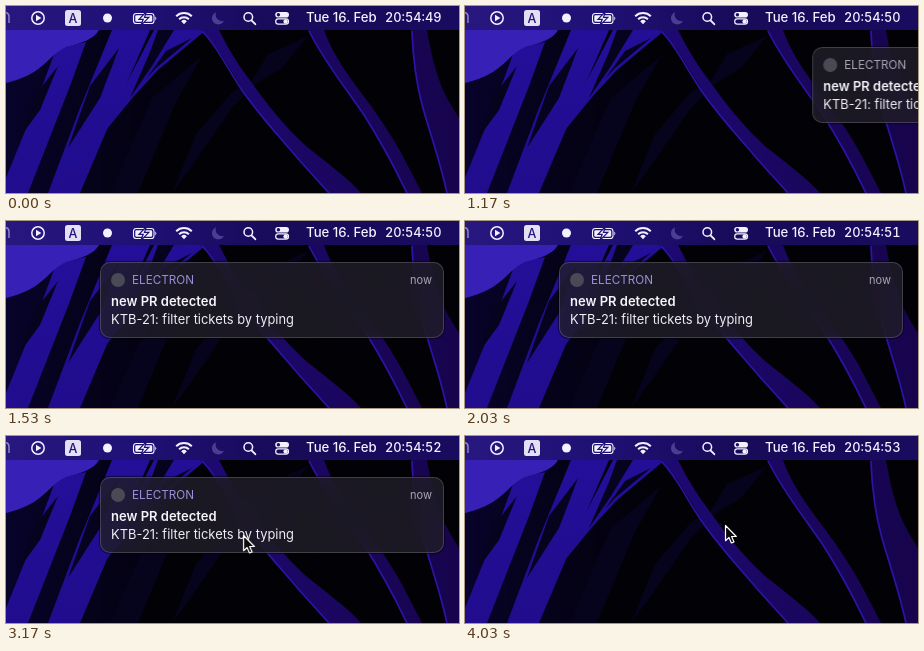
These frames come from a looping animation (453 px wide and 187 px high, 4.06 s). An HTML page:

```html
<!DOCTYPE html>
<html lang="en">
<head>
<meta charset="utf-8">
<title>Desktop notification</title>
<style>
  html, body { margin: 0; width: 100%; height: 100%; overflow: hidden; background: #020105; }
  body { position: relative; font-family: Inter, Roboto, sans-serif; }
  svg { position: absolute; left: 0; top: 0; display: block; overflow: visible; }

  .clock {
    position: absolute; left: 379px; top: 4px; height: 16px; overflow: hidden;
    font-size: 12.8px; font-weight: 500; line-height: 16px; color: #f3f0ff;
    font-variant-numeric: tabular-nums; white-space: nowrap;
  }
  .clock div { animation: tick 4060ms step-end infinite; }
  .clock span { display: block; }

  .card {
    position: absolute; left: 94px; top: 41px; width: 344px; height: 76px;
    box-sizing: border-box; border-radius: 10px;
    background: rgba(33, 30, 40, .8);
    -webkit-backdrop-filter: blur(18px); backdrop-filter: blur(18px);
    box-shadow: inset 0 0 0 1px rgba(255, 255, 255, .17), 0 0 1px 1px rgba(0, 0, 0, .5);
    animation: slide 4060ms infinite, fade 4060ms infinite;
  }
  .app { font-size: 11.7px; animation: tint 4060ms infinite; }
  .title { font-size: 13px; font-weight: 600; fill: #f6f4fa; }
  .body { font-size: 12.9px; fill: #efedf4; }
  .now { font-size: 11px; fill: #a9a6b2; }

  .pointer { animation: point 4060ms infinite; }

  @keyframes tick {
    0% { transform: none; }
    23.4% { transform: translateY(-16px); }
    48.03% { transform: translateY(-32px); }
    72.66% { transform: translateY(-48px); }
    97.29%, 100% { transform: translateY(-64px); }
  }
  @keyframes slide {
    0%, 26.85% { transform: translateX(362px); animation-timing-function: ease; }
    36.7%, 100% { transform: none; }
  }
  @keyframes fade {
    0%, 93.6% { opacity: 1; animation-timing-function: ease-in-out; }
    99.4%, 100% { opacity: 0; }
  }
  @keyframes tint {
    0%, 28.8% { fill: #aaa7b3; }
    36%, 100% { fill: #9c8fd9; }
  }
  @keyframes point {
    0%, 68.97% { transform: translate(218px, 190px); animation-timing-function: ease-out; }
    78.08% { transform: translate(237px, 99px); animation-timing-function: ease-out; }
    86.2%, 100% { transform: translate(260px, 89px); }
  }
</style>
</head>
<body>

<svg width="453" height="187" viewBox="0 0 453 187">
  <defs>
    <linearGradient id="bar">
      <stop offset="0" stop-color="#27177f"/>
      <stop offset=".3" stop-color="#1f1074"/>
      <stop offset=".6" stop-color="#180b59"/>
      <stop offset="1" stop-color="#190b5e"/>
    </linearGradient>
    <linearGradient id="leaf" x1="0" y1="24" x2="40" y2="187" gradientUnits="userSpaceOnUse">
      <stop offset="0" stop-color="#240f9c"/>
      <stop offset="1" stop-color="#200c8c"/>
    </linearGradient>
    <linearGradient id="branch" x1="200" y1="0" x2="453" y2="0" gradientUnits="userSpaceOnUse">
      <stop offset="0" stop-color="#1d0972"/>
      <stop offset="1" stop-color="#17044c"/>
    </linearGradient>
    <linearGradient id="dusk" x1="0" x2="200" y1="0" y2="0" gradientUnits="userSpaceOnUse">
      <stop offset="0" stop-color="#07032a"/>
      <stop offset="1" stop-color="#020105"/>
    </linearGradient>
  </defs>

  <!-- wallpaper -->
  <rect width="453" height="187" fill="#020105"/>
  <path fill="url(#dusk)" d="M0 24H205L110 187H0Z"/>
  <g fill="#06031d">
    <path d="M196 50L170 96L132 187H104L146 92Z"/>
    <path d="M262 66L226 102L186 160L166 187L190 128L226 86Z"/>
    <path d="M302 30L276 62L240 84L262 48Z"/>
  </g>
  <g fill="url(#leaf)">
    <path d="M50 43L80 36L64 80L22 187H0V172L26 108Z"/>
    <path d="M106 24H144L116 88L74 187H42L74 102Z"/>
    <path d="M148 24H200L152 64L128 90L100 124L116 86Z"/>
  </g>
  <g fill="#06031f">
    <path d="M113 42L94 92L62 142L84 80Z"/>
    <path d="M168 24L146 60L124 92L144 46L152 24Z"/>
    <path d="M186 32L150 62L140 73L160 45Z"/>
    <path d="M52 60L34 104L12 134L30 88Z"/>
  </g>
  <path fill="#3720b5" d="M0 24H93C88 33 76 37 60 41C48 46 42 57 28 66C18 72 8 75 0 77Z"/>

  <g fill="url(#branch)">
    <path d="M194 24H213C222 42 231 57 243 73C260 97 278 120 300 140C322 158 342 172 355 187H322C304 166 284 143 262 119C241 93 229 70 216 50C210 40 202 32 194 24Z"/>
    <path d="M302 24H318C325 44 337 62 350 80C370 106 388 132 402 160L416 187H400C386 158 372 132 357 108C338 80 318 56 302 24Z"/>
    <path d="M405 24H421C425 48 430 68 438 86C444 98 449 106 453 112V187H440C434 158 424 130 416 102C409 76 406 50 405 24Z"/>
  </g>
  <g fill="none" stroke="#2d14a6" stroke-width="1.6">
    <path d="M196 25C211 40 220 60 232 78C248 104 274 131 294 155L323 187"/>
    <path d="M303 25C319 57 339 81 358 109C374 134 388 160 401 187"/>
    <path d="M406 25C407 51 410 77 417 102C425 130 435 158 441 187"/>
  </g>

  <!-- menu bar -->
  <rect width="453" height="24" fill="url(#bar)"/>
  <g fill="none" stroke="#f3f0ff" stroke-width="1.5">
    <path d="M-3 9C0 5 3 7 3 11V17" stroke="#8d84c4"/>
    <circle cx="32" cy="12" r="6.2"/>
    <circle cx="242.3" cy="11" r="4.3"/>
    <path d="M245.5 14.3L249.3 18.2" stroke-width="1.9" stroke-linecap="round"/>
    <rect x="127.5" y="7.5" width="20.5" height="10" rx="2.8" stroke-width="1.1"/>
    <rect x="269.7" y="12.9" width="12.8" height="5.2" rx="2.6" stroke-width="1.2"/>
    <g stroke-width="2">
      <path d="M170.2 10.2A11.2 11.2 0 0 1 185.8 10.2"/>
      <path d="M173.1 13.2A7 7 0 0 1 182.9 13.2"/>
    </g>
  </g>
  <g fill="#f3f0ff">
    <path d="M30 8.8L35.4 12L30 15.2Z"/>
    <rect x="59" y="4" width="16" height="16" rx="2.5" fill="#e4e0f3"/>
    <circle cx="101.5" cy="12" r="4.5"/>
    <rect x="129.3" y="9.3" width="16.9" height="6.4" rx="1.3"/>
    <path d="M149.3 10.6Q151.3 12.5 149.3 14.4Z"/>
    <path d="M175.2 15.2A4 4 0 0 1 180.8 15.2L178 18.3Z"/>
    <rect x="269.2" y="5.9" width="13.8" height="5.6" rx="2.8"/>
    <circle cx="279.6" cy="15.5" r="2.2"/>
  </g>
  <circle cx="272.4" cy="8.7" r="1.7" fill="#1b0d66"/>
  <path d="M140.5 5.5L133 13.3H137.2L135 19.3L142.8 11.4H138.5Z" fill="#f3f0ff" stroke="#1f1074" stroke-width="1.2"/>
  <path d="M210.2 6.2A6.3 6.3 0 1 0 218 14.8A6.4 6.4 0 0 1 210.2 6.2Z" fill="#4c3d92"/>
  <text x="67" y="16.5" text-anchor="middle" font-size="12.5" font-weight="500" fill="#24147f">A</text>
  <text x="300" y="16" font-size="13.2" font-weight="500" fill="#f3f0ff">Tue 16. Feb</text>
</svg>

<div class="clock"><div>
  <span>20:54:49</span><span>20:54:50</span><span>20:54:51</span><span>20:54:52</span><span>20:54:53</span>
</div></div>

<div class="card">
  <svg width="344" height="76" viewBox="0 0 344 76">
    <circle cx="18" cy="18" r="7" fill="#4a4956"/>
    <text class="app" x="32" y="22.3">ELECTRON</text>
    <text class="now" x="332" y="22" text-anchor="end">now</text>
    <text class="title" x="11" y="43.8">new PR detected</text>
    <text class="body" x="11" y="61.8">KTB-21: filter tickets by typing</text>
  </svg>
</div>

<svg width="453" height="187" viewBox="0 0 453 187">
  <path class="pointer" d="M0.5 0.5V15.7L4 12.5L6.4 18L9 16.9L6.6 11.5H11.3Z"
        fill="#0a0a0c" stroke="#fff" stroke-width="1.2" stroke-linejoin="round"/>
</svg>

</body>
</html>
```
